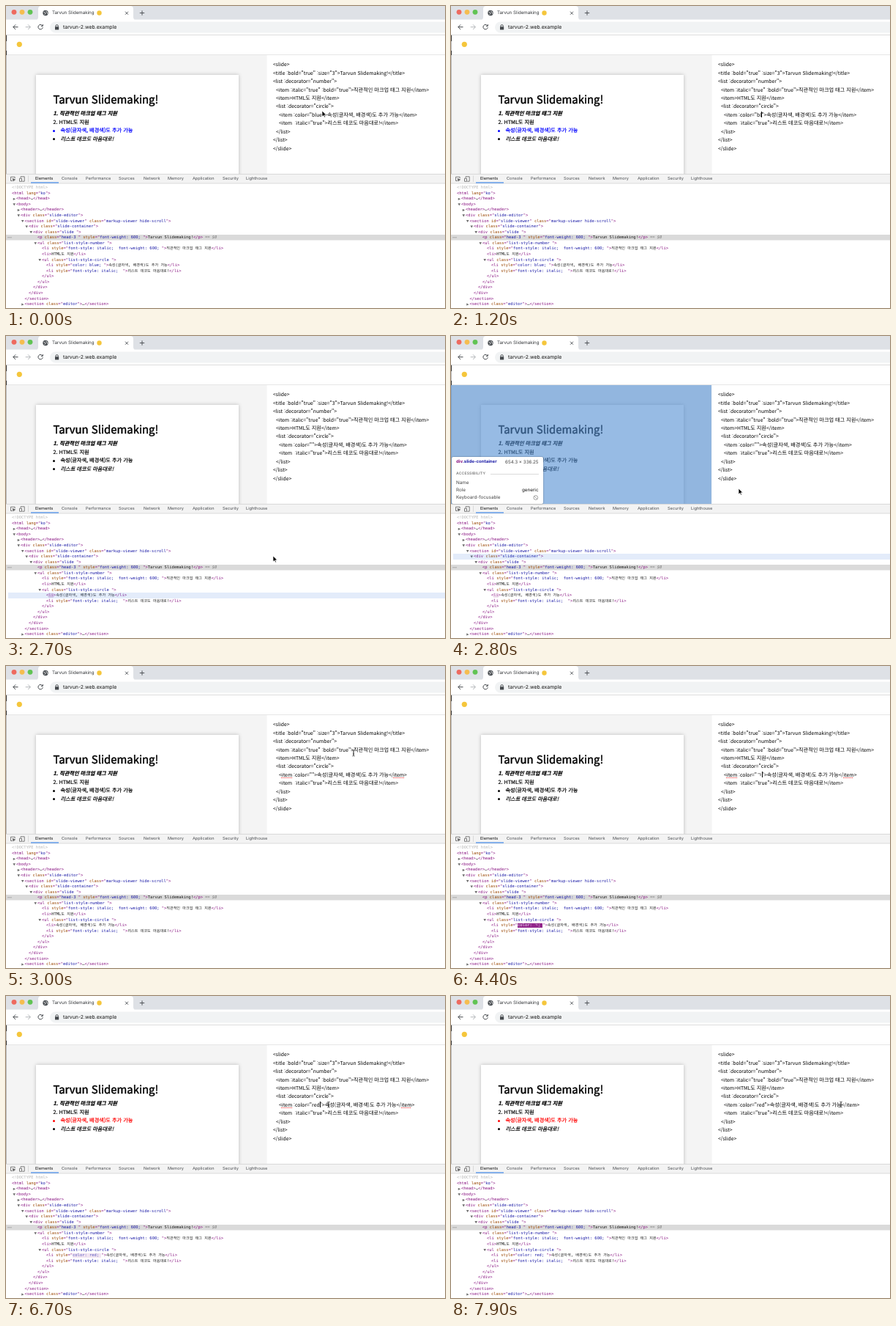
Recreate the animation shown at these times as an HTML page. Size 600 by 412 pixels, loop 8 s.

```html
<!DOCTYPE html>
<html lang="ko">
<head>
<meta charset="utf-8">
<title>Markup slides</title>
<style>
html, body { margin: 0; width: 100%; height: 100%; overflow: hidden; background: #fff; }
#stage { position: relative; width: 600px; height: 412px; overflow: hidden; text-rendering: geometricPrecision; }
#stage svg, .layer { position: absolute; left: 0; top: 0; }
.t { position: absolute; white-space: pre; line-height: 10px; }
.t i { font-style: normal; }
.k { line-height: 0; }

#ui { font: 5.6px Inter, sans-serif; color: #4a4d51; }
.tab { font-size: 6.2px; color: #303336; }
.url { font-size: 6.9px; color: #111; }
.on { color: #111; }

#slide { font: 7.2px "Noto Sans CJK KR", "Noto Sans CJK", sans-serif; color: #000; -webkit-text-stroke: .2px; }
.head { font-size: 14.9px; -webkit-text-stroke: .45px; }
.strong { font-weight: 700; }
.em { font-style: italic; }
.dot::before { content: ""; position: absolute; left: -10.6px; top: 3.4px; width: 3.4px; height: 3.4px; border-radius: 50%; background: currentColor; }

#editor { font: 6.8px "Noto Sans CJK KR", "Noto Sans CJK", sans-serif; color: #000; }
#editor .k { font-size: 7.18px; }
.typo i.w { text-decoration: underline dotted #f22 1px; text-underline-offset: .8px; }
.caret { display: inline-block; width: .7px; height: 8px; margin-right: -.7px; background: #000; vertical-align: -1.5px; line-height: 0; }

#tree { font: 5.45px "DejaVu Sans Mono", "Noto Sans CJK KR", "Noto Sans CJK", monospace; color: #1c1c1c; }
#tree .k { font-size: 5.1px; }
.tag { color: #881280; }
.a { color: #994500; }
.v { color: #1a1aa6; }
.dim { color: #b5b5b5; }
.open::before, .shut::before { content: ""; position: absolute; left: -4.6px; top: 3.4px; width: 3.6px; height: 3.4px; background: #6e6e6e; clip-path: polygon(0 0, 100% 0, 50% 100%); }
.shut::before { clip-path: polygon(10% 0, 100% 50%, 10% 100%); }

#hover { font: 6.3px Inter, sans-serif; color: #444; }
#tint { position: absolute; left: 0; top: 67px; width: 356px; height: 162px; background: rgba(82, 142, 211, .6); }
#tip { position: absolute; left: 1px; top: 165px; width: 125px; height: 64px; border-radius: 2px; background: #fff; box-shadow: 0 0 2px rgba(0, 0, 0, .45); }
#rowtint { position: absolute; left: 3px; width: 597px; height: 7.6px; background: rgba(56, 121, 217, .14); }
.sel { font-weight: 700; font-size: 6px; color: #1a1aa6; }
.cap { font-weight: 600; font-size: 5px; letter-spacing: .2px; color: #777; }
</style>
</head>
<body>
<div id="stage">
  <svg width="600" height="412" fill="none">
    <!-- browser frame -->
    <path fill="#dee1e6" d="M0 0h600v19H0z"/>
    <path fill="#fff" d="M40 19q4 0 4-4V4q0-4 4-4h122q4 0 4 4v11q0 4 4 4zM0 18.5h600V39H0z"/>
    <circle cx="11" cy="8.3" r="3.4" fill="#ee6a5f"/>
    <circle cx="22" cy="8.3" r="3.4" fill="#f5bd4f"/>
    <circle cx="33" cy="8.3" r="3.4" fill="#61c454"/>
    <circle cx="54" cy="9.5" r="3.7" fill="#4c5054"/>
    <path stroke="#fff" stroke-width=".8" d="M51.6 8.2q2 .2 2.2 1.6t-1.4 2M55 6.8q-.6 1.4 1 1.8t.2 2.2"/>
    <circle cx="127.5" cy="9.5" r="3.2" fill="#f5c63c"/>
    <path stroke="#45494d" stroke-width=".9" d="M163 7.7l4 4m0-4l-4 4M182.8 9.5h6.4M186 6.3v6.4"/>
    <rect x="60" y="21.5" width="560" height="15" rx="7.5" fill="#f1f3f4"/>
    <g stroke="#45494d">
      <path d="M16.5 28.7h-6.6m3.2-3.3l-3.3 3.3 3.3 3.3"/>
      <path stroke="#b4b7ba" d="M26.7 28.7h6.6m-3.2-3.3l3.3 3.3-3.3 3.3"/>
      <path d="M49.6 26.6a3.2 3.2 0 1 0 .7 2.6M50.3 25v2.4h-2.4"/>
      <path d="M68 28.5v-1.3a1.6 1.6 0 0 1 3.2 0v1.3"/>
    </g>
    <path fill="#45494d" d="M67 28.2h5.2v4.2H67z"/>
    <path stroke="#dcdcdc" d="M0 39.5h600"/>
    <!-- page -->
    <circle cx="18.3" cy="52.3" r="3.6" fill="#f5c63c"/>
    <path fill="#f4f4f4" d="M0 67h356.5v162H0z"/>
    <path stroke="#e6e6e6" d="M0 66.5h600"/>
    <path fill="#fff" d="M41 94h277v140H41z" style="filter:drop-shadow(0 .5px 2.5px rgba(0,0,0,.24))"/>
    <path fill="#bbb" d="M0 39h1v190H0z"/>
    <path fill="#333" d="M0 40h1v8H0zM0 61h1v6H0z"/>
    <!-- inspector -->
    <path fill="#fff" d="M0 229h600v183H0z"/>
    <path fill="#f3f3f3" d="M0 229h600v13H0z"/>
    <path stroke="#cdcdcd" stroke-width=".7" d="M0 229.4h600M0 242h600M30.5 231.5v8.5"/>
    <path stroke="#1a73e8" d="M34 241h38"/>
    <g stroke="#5e5e5e" stroke-width=".8">
      <path d="M9 238.5H6.5v-5.3h5.6v2"/>
      <path fill="#5e5e5e" d="M9 235.5l3.6 1.4-1.6.6-.6 1.6z"/>
      <path d="M20 234.5v-1.7h5.2v6.4h-3M18.5 235.3h3v4h-3z"/>
    </g>
    <path fill="#dadada" d="M0 311.9h600v7.6H0z"/>
    <path stroke="#777" stroke-dasharray="1 1" d="M2.5 315.8h5"/>
  </svg>
  <div id="ui" class="layer"></div>
  <div id="slide" class="layer"></div>
  <div id="editor" class="layer"></div>
  <div id="tree" class="layer"></div>
  <div id="rowtint"></div>
  <div id="hover" class="layer">
    <div id="tint"></div><div id="tip"></div>
    <svg width="600" height="412" fill="none" stroke="#777" stroke-width=".7">
      <path stroke="#ccc" d="M54 188.5h66"/>
      <circle cx="115.8" cy="220.5" r="2.9"/><path d="M113.8 218.5l4 4"/>
    </svg>
  </div>
  <svg width="600" height="412">
    <path id="arrow" fill="#000" stroke="#fff" stroke-width=".7" d="M0 0V8L1.9 6.3 3.1 9 4.4 8.4 3.2 5.8H5.8Z"/>
    <path id="beam" fill="none" stroke="#333" stroke-width=".7" d="M-1.7-4Q0-4 0-3V3Q0 4-1.7 4M1.7-4Q0-4 0-3V3Q0 4 1.7 4M-1 1H1"/>
  </svg>
</div>
<script>
const NAME = 'Tarvun Slidemaking';
const LOOP = 8000, STEP = 100;
const ROW_TOP = 248.1, ROW = 7.57;
const $ = id => document.getElementById(id);
const esc = s => s.replace(/</g, '&lt;').replace(/>/g, '&gt;');
const ko = s => s.replace(/[가-힣ㄱ-ㅎ]+/g, '<span class="k">$&</span>');

function put(box, x, y, html, cls = '') {
  const d = document.createElement('div');
  d.className = 't ' + cls;
  d.style.left = x + 'px';
  d.style.top = y - 5 + 'px';
  d.innerHTML = ko(html);
  $(box).append(d);
  return d;
}

// Colours a line of markup the way an inspector does.
function paint(line) {
  return ko(line.replace(/<[^>]*>|[^<]+/g, part => {
    if (part[0] !== '<') return part;
    const body = part.slice(1, -1)
      .replace(/([\w-]+)="([^"]*)"/g, '<i class=a>$1</i>="<i class=v>$2</i>"')
      .replace(/^\w+/, '<i class=n>$&</i>');
    return `<i class=tag>&lt;${body}&gt;</i>`;
  }));
}

put('ui', 63, 9.7, NAME, 'tab');
put('ui', 78, 29, 'tarvun-2.web.example', 'url');
[[40, 'Elements'], [76, 'Console'], [109, 'Performance'], [154, 'Sources'], [188, 'Network'],
 [221, 'Memory'], [255, 'Application'], [296, 'Security'], [328, 'Lighthouse']]
  .forEach(([x, s], i) => put('ui', x, 236.3, s, i ? '' : 'on'));

const FIRST = '직관적인 마크업 태그 지원', SECOND = 'HTML도 지원';
const THIRD = '속성(글자색, 배경색)도 추가 가능', FOURTH = '리스트 데코도 마음대로!';

put('slide', 64.5, 128, NAME + '!', 'head');
put('slide', 64.5, 147.4, '1. ' + FIRST, 'strong em');
put('slide', 64.5, 158.8, '2. ' + SECOND);
const colored = put('slide', 74.5, 170.2, THIRD, 'dot');
put('slide', 74.5, 181.6, FOURTH, 'dot em');

const source = [
  [0, '<slide>'],
  [0, `<title :bold="true" :size="3">${NAME}!</title>`],
  [0, '<list :decorator="number">'],
  [1, `<item :italic="true" :bold="true">${FIRST}</item>`],
  [1, `<item>${SECOND}</item>`],
  [1, '<list :decorator="circle">'],
  [2, ''],
  [2, `<item  :italic="true">${FOURTH}</item>`],
  [1, '</list>'],
  [0, '</list>'],
  [0, '</slide>']
].map(([depth, s], i) => put('editor', 365 + 4 * depth, 79.3 + 11.42 * i, esc(s)));
const editLine = source[6];

const nodes = [
  [8, '', ''],
  [8, '', '<html lang="ko">'],
  [14, 'shut', '<head>…</head>'],
  [14, 'open', '<body>'],
  [20, 'shut', '<header>…</header>'],
  [20, 'open', '<div class="slide-editor">'],
  [25.5, 'open', '<section id="slide-viewer" class="markup-viewer hide-scroll">'],
  [31, 'open', '<div class="slide-container">'],
  [37, 'open', '<div class="slide ">'],
  [43, '', `<p class="head-3 " style="font-weight: 600; ">${NAME}!</p>`],
  [43, 'open', '<ul class="list-style-number ">'],
  [49, '', `<li style="font-style: italic;  font-weight: 600; ">${FIRST}</li>`],
  [49, '', `<li>${SECOND}</li>`],
  [49, 'open', '<ul class="list-style-circle ">'],
  [55, '', ''],
  [55, '', `<li style="font-style: italic;  ">${FOURTH}</li>`],
  [49, '', '</ul>'],
  [43, '', '</ul>'],
  [37, '', '</div>'],
  [31, '', '</div>'],
  [25.5, '', '</section>'],
  [25.5, 'shut', '<section class="editor">…</section>']
].map(([x, cls, s], i) => {
  const row = put('tree', x, ROW_TOP + ROW * i, '', cls);
  row.innerHTML = paint(s);
  return row;
});
const liveRow = nodes[14], CONTAINER = 7;
nodes[0].innerHTML = '<i class=dim>&lt;!DOCTYPE html&gt;</i>';
put('tree', 272, ROW_TOP + ROW * 9, '== $0', 'em').style.color = '#777';

put('hover', 7, 172, '<i class=tag>div</i>.slide-container', 'sel');
put('hover', 74, 172, '654.3 × 336.25');
put('hover', 7, 188.3, 'ACCESSIBILITY', 'cap');
put('hover', 7, 200, 'Name');
put('hover', 7, 210, 'Role');
put('hover', 97, 210, 'generic').style.color = '#111';
put('hover', 7, 220.3, 'Keyboard-focusable');

// Typed value in the editor, and the debounced value on the slide.
const typed = [[0, 'blue'], [1100, 'blu'], [1200, 'bl'], [1300, 'b'], [1400, ''],
  [4000, 'ㄱ'], [4200, 'ㄱㄷ'], [4300, 'ㄱ'], [4600, ''], [4700, 'r'], [4800, 're'], [5500, 'red']];
const live = [[0, 'blue'], [1850, ''], [4330, 'ㄱ'], [4900, 're'], [5700, 'red']];
const FLASH = 1400;

const tracks = [
  [[0, 432, 143], [1000, 432, 143], [1100, 432, 148]],
  [[2000, 432, 148], [2300, 340, 340], [2600, 320, 352], [2700, 365, 300], [2800, 393, 208],
   [3000, 475, 119], [3400, 423, 148], [4000, 423, 148]],
  [[6600, 423, 148], [7200, 531, 149], [7400, 533, 148], [LOOP, 533, 148]]
];

const last = (list, t) => list.filter(s => s[0] <= t).pop();
const within = (t, a, b) => t >= a && t < b;

function pointer(t) {
  const track = tracks.find(p => within(t, p[0][0], p[p.length - 1][0]));
  if (!track) return null;
  const i = track.findIndex(p => p[0] > t);
  const [t0, x0, y0] = track[i - 1], [t1, x1, y1] = track[i];
  const k = (t - t0) / (t1 - t0);
  return [x0 + (x1 - x0) * k, y0 + (y1 - y0) * k];
}

function setHtml(el, html) {
  if (el.shown !== html) el.innerHTML = el.shown = html;
}

const show = (id, on) => { $(id).style.display = on ? '' : 'none'; };

function drawEditor(t) {
  const [since, value] = last(typed, t);
  const focus = within(t, 1000, 2600) ? 1000 : within(t, 3450, 6900) ? 3450 : null;
  const blink = focus !== null && (t - Math.max(since, focus)) % 1000 < 500;
  const caret = blink ? '<i class=caret></i>' : '';
  setHtml(editLine, ko(`&lt;<i class=w>item</i> :color="${value}${caret}"&gt;${THIRD}&lt;/<i class=w>item</i>&gt;`));
  editLine.classList.toggle('typo', within(t, 2900, 6900));
}

function drawLive(t) {
  const [since, value] = last(live, t);
  colored.style.color = value === 'blue' || value === 'red' ? value : '';
  const style = value && ` style="color: ${value}; "`;
  setHtml(liveRow, paint(`<li${style}>${THIRD}</li>`));
  const spot = liveRow.querySelector('.v') || liveRow.querySelector('.n');
  const k = (t - since) / FLASH;
  const on = since > 0 && k < 1;
  const base = value ? [26, 26, 166] : [136, 18, 128];
  spot.style.background = on ? `rgba(136,18,128,${(1 - k) ** 1.8})` : '';
  spot.style.color = on ? `rgb(${base.map(c => 255 + (c - 255) * k)})` : '';
}

function drawPointer(t) {
  const at = pointer(t);
  const isArrow = at && (t < 1000 || at[1] > 195);
  [['arrow', isArrow], ['beam', at && !isArrow]].forEach(([id, on]) => {
    show(id, on);
    if (on) $(id).setAttribute('transform', `translate(${at})`);
  });
}

// The inspector marks the row that was under the pointer one step earlier.
function drawHover(t) {
  const at = pointer(t - STEP);
  const row = at ? Math.round((at[1] - ROW_TOP) / ROW) : -1;
  show('rowtint', row >= 0);
  $('rowtint').style.top = ROW_TOP + ROW * (row - .5) + 'px';
  show('hover', row === CONTAINER);
}

function frame() {
  const t = Math.floor(performance.now() % LOOP / STEP) * STEP;
  drawEditor(t);
  drawLive(t);
  drawPointer(t);
  drawHover(t);
  requestAnimationFrame(frame);
}
frame();
</script>
</body>
</html>
```
